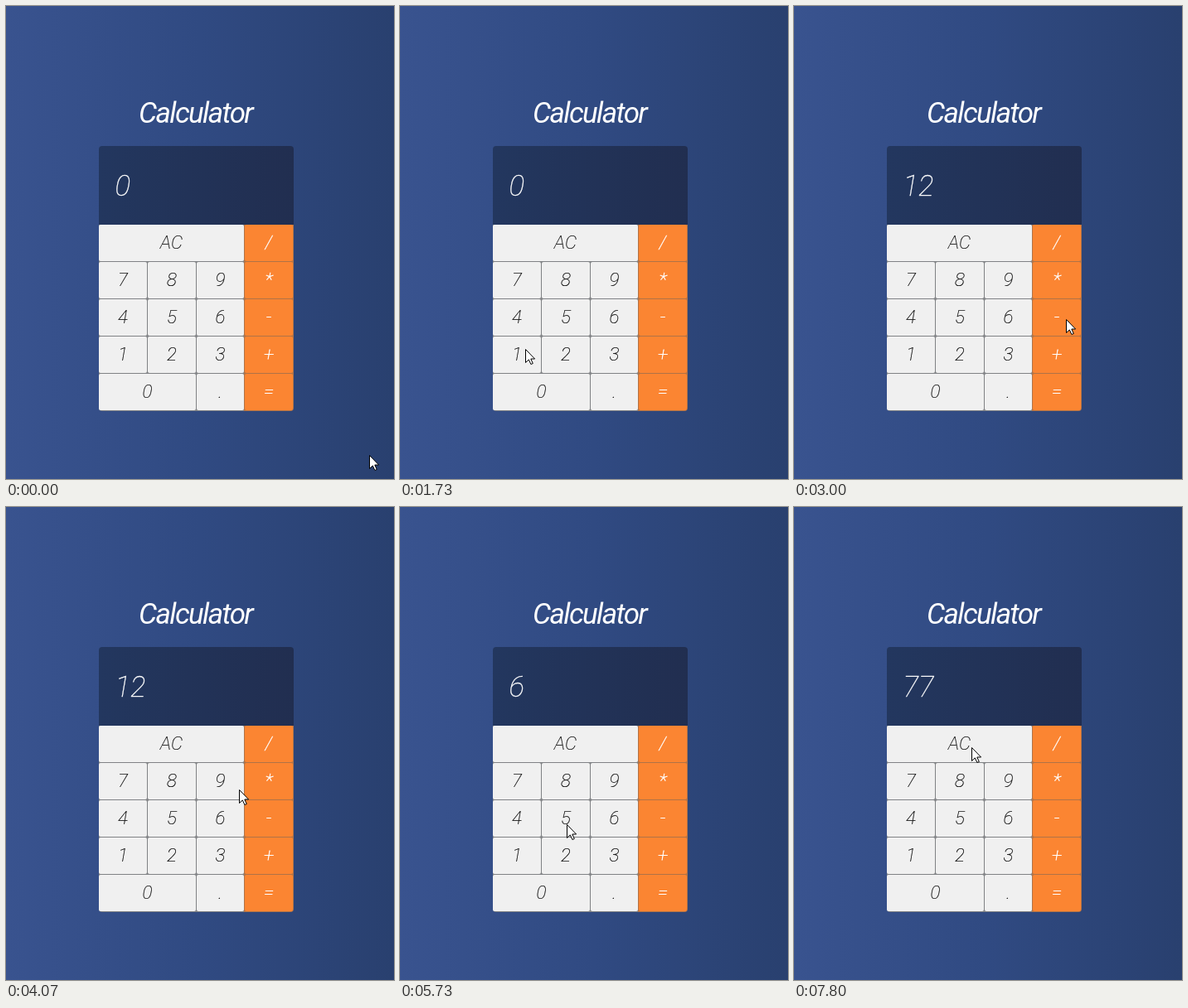
Write an HTML page that moves like this. It is 468 px wide and 571 px high and loops after 8000 ms.

```html
<!DOCTYPE html>
<html lang="en">
<head>
<meta charset="utf-8">
<title>Calculator</title>
<style>
  html, body { margin: 0; width: 100%; height: 100%; overflow: hidden; background: #304a82; }
  svg { display: block; width: 468px; height: 571px; }
  text { font-family: Roboto, "Liberation Sans", sans-serif; font-style: italic; }
  .title { font-size: 35px; letter-spacing: -0.047em; fill: #fff; }
  .value { font-size: 35px; font-weight: 100; fill: #fff; stroke: #fff; stroke-width: .35px; }
  .key text { font-size: 22.4px; font-weight: 100; text-anchor: middle; fill: #000; stroke: #000; stroke-width: .2px; }
  .key rect { fill: #f0f0f0; }
  .key.op text { fill: #fff; stroke: #fff; stroke-width: .5px; }
  .key.op rect { fill: #fb8532; }
  .key.down rect { fill: #dedede; }
  .key.op.down rect { fill: #e87828; }
</style>
</head>
<body>
<svg viewBox="0 0 468 571">
  <defs>
    <linearGradient id="sky">
      <stop offset="0" stop-color="#39538f"/>
      <stop offset=".5" stop-color="#304a82"/>
      <stop offset="1" stop-color="#29406f"/>
    </linearGradient>
    <linearGradient id="glass">
      <stop offset="0" stop-color="#23375f"/>
      <stop offset="1" stop-color="#212e50"/>
    </linearGradient>
  </defs>
  <rect width="468" height="571" fill="url(#sky)"/>
  <text class="title" x="160" y="141">Calculator</text>
  <path d="M112 264V173q0-4 4-4H343q4 0 4 4V264z" fill="url(#glass)"/>
  <text class="value" id="value" x="131.5" y="229">0</text>
  <path d="M112 264H287V489H116q-4 0-4-4z" fill="#808285"/>
  <path d="M287 264H347V485q0 4-4 4H287z" fill="#b07347"/>
  <g id="keys"></g>
  <path id="cursor" d="M.5 .5V16.5L4.3 12.9 6.9 18.5 9.3 17.5 6.8 12H11.6z"
    fill="#fff" stroke="#000" stroke-linejoin="round"/>
</svg>
<script>
const LOOP = 8000, TICK = 1000 / 15, HOLD = 2;
const $ = id => document.getElementById(id);
const keys = [];

function addKey(label, col, row, span = 1) {
  const left = Math.round(112 + col * 58.75);
  const right = Math.round(112 + (col + span) * 58.75);
  const top = 264 + row * 45;
  const el = document.createElementNS("http://www.w3.org/2000/svg", "g");
  el.setAttribute("class", col === 3 ? "key op" : "key");
  el.innerHTML =
    `<rect x="${left}" y="${top}" width="${right - left - 1}" height="44" rx="2"/>` +
    `<text x="${(left + right - 1) / 2}" y="${top + 29}">${label}</text>`;
  $("keys").append(el);
  keys.push({ label, left, right, top, el });
}

addKey("AC", 0, 0, 3);
["789", "456", "123"].forEach((line, r) =>
  [...line].forEach((label, c) => addKey(label, c, r + 1)));
addKey("0", 0, 4, 2);
addKey(".", 2, 4);
[..."/*-+="].forEach((label, r) => addKey(label, 3, r));

// Pointer stops: tick of arrival, x, y, ticks of rest
const path = [
  [0, 438, 542], [1, 432, 536, 2], [8, 258, 375, 4], [17, 215, 345],
  [26, 151, 414, 2], [38, 264, 412], [42, 300, 342], [45, 328, 378],
  [49, 325, 418, 3], [59, 259, 325], [61, 281, 341], [64, 303, 372],
  [69, 262, 390, 4], [76, 257, 421, 2], [83, 187, 395, 1], [86, 201, 383, 3],
  [94, 332, 483], [98, 326, 471, 6], [109, 269, 370, 3], [117, 214, 290, 3]
].flatMap(([n, x, y, rest]) => rest ? [[n, x, y], [n + rest, x, y]] : [[n, x, y]]);

// Slope at a stop, flat at turning points so the curve never overshoots
function slope(i, axis) {
  const a = path[i - 1], b = path[i], c = path[i + 1];
  if (!a || !c) return 0;
  const p = (b[axis] - a[axis]) / (b[0] - a[0]);
  const q = (c[axis] - b[axis]) / (c[0] - b[0]);
  return p * q <= 0 ? 0 : 2 * p * q / (p + q);
}

function along(n, axis) {
  let i = 0;
  while (i < path.length - 2 && path[i + 1][0] <= n) i++;
  const a = path[i], b = path[i + 1], h = b[0] - a[0], u = (n - a[0]) / h;
  const v = 1 - u;
  return Math.round(
    v * v * (1 + 2 * u) * a[axis] + u * u * (1 + 2 * v) * b[axis] +
    h * u * v * (v * slope(i, axis) - u * slope(i + 1, axis)));
}

const pointer = n => [along(n, 1), along(n, 2)];

function keyAt([x, y]) {
  return keys.find(k => x >= k.left && x < k.right && y >= k.top && y < k.top + 45);
}

const clicks = [27, 33, 50, 72, 87, 98].map(down => ({ down, key: keyAt(pointer(down)) }));

// Replays the finished clicks through a small adding machine
function valueAt(n) {
  let shown = "0", sum = 0, fresh = true;
  for (const { down, key } of clicks) {
    if (n < down + HOLD) break;
    if (key.label === "+") {
      sum += +shown;
      fresh = true;
    } else if (key.label === "=") {
      shown = String(sum + +shown);
    } else {
      shown = fresh ? key.label : shown + key.label;
      fresh = false;
    }
  }
  return shown;
}

function draw(n) {
  for (const { down, key } of clicks)
    key.el.classList.toggle("down", n >= down && n < down + HOLD);
  $("value").textContent = valueAt(n);
  $("cursor").setAttribute("transform", `translate(${pointer(n)})`);
}

const start = performance.now();
function loop(now) {
  const t = Math.max(0, now - start) % LOOP;
  draw(Math.floor((t + 5) / TICK) % 120);
  requestAnimationFrame(loop);
}
draw(0);
requestAnimationFrame(loop);
</script>
</body>
</html>
```
